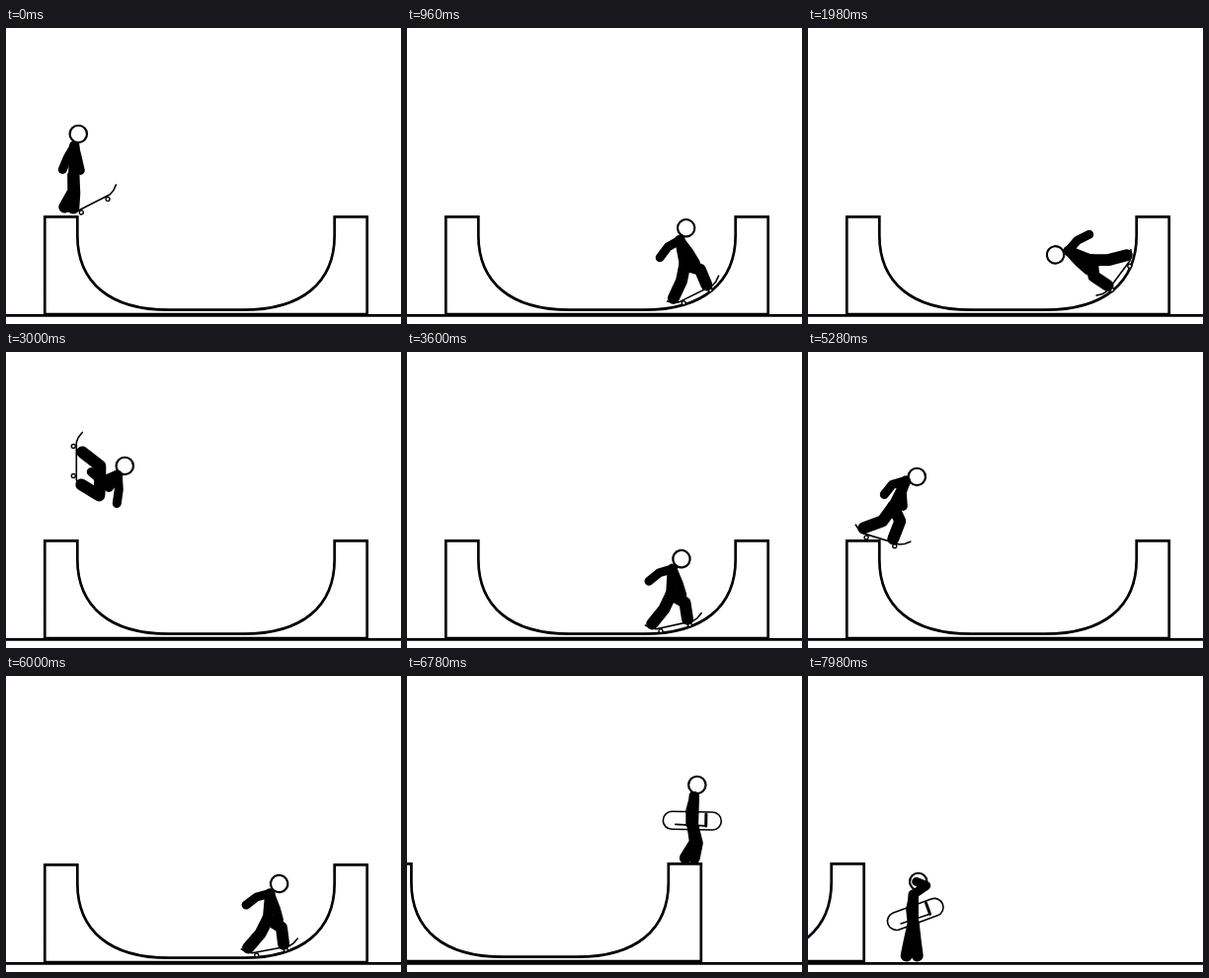
These frames come from a looping animation (400 px wide and 300 px high, 8 s). An HTML page with a canvas:

```html
<!DOCTYPE html>
<html lang="en">
<head>
<meta charset="utf-8">
<title>Half-pipe</title>
<style>
html, body { margin: 0; width: 100%; height: 100%; overflow: hidden; background: #fff; }
canvas { display: block; width: 100%; height: 100%; }
</style>
</head>
<body>
<canvas id="stage" width="400" height="300"></canvas>
<script>
const LOOP = 8000, STEP = 60;
const ctx = document.getElementById('stage').getContext('2d');
const rad = Math.PI / 180;
const mix = (a, b, p) => a + (b - a) * p;

const bowl = 'V210 C72.3 258 105 285.7 165 285.7 H240 C300 285.7 332.7 258 332.7 210 V';
const rampShape = new Path2D(`M39.3 290 V191.3 H72.3 ${bowl}191.3 H365.7 V290 Z`);
const track = document.createElementNS('http://www.w3.org/2000/svg', 'path');
track.setAttribute('d', `M72.3 0 ${bowl}0`);
const middle = track.getTotalLength() / 2;

// Board centre and slope at distance u from the middle of the bowl.
function onRamp(u) {
  const p = track.getPointAtLength(middle + u);
  const a = track.getPointAtLength(middle + u - 1);
  const b = track.getPointAtLength(middle + u + 1);
  const angle = Math.atan2(b.y - a.y, b.x - a.x);
  return { x: p.x + 6 * Math.sin(angle), y: p.y - 6 * Math.cos(angle), angle: angle / rad };
}

// Joints relative to the board centre; limbs are [middle joint, end].
const ready = {
  head: [-15, -70], neck: [-19, -58], hip: [-20, -28],
  armA: [-26, -46, -31, -34], armB: [-16, -46, -13, -33],
  legA: [-20, -12, -29, 4], legB: [-19, -10, -20, 5]
};
const ride = {
  head: [21, -64], neck: [10, -56], hip: [3, -31],
  armA: [-4, -55, -16, -49], armB: [13, -40, 14, -28],
  legA: [-7, -18, -22, -6], legB: [15, -20, 14, -3]
};
const grab = {
  head: [5, -49], neck: [14, -42], hip: [22, -24],
  armA: [29, -43, 43, -41], armB: [27, -33, 11, -15],
  legA: [5, -24, -9, -6], legB: [35, -23, 24, -5]
};
const kick = {
  head: [-47, -44], neck: [-51, -33], hip: [-42, -6],
  armA: [-61, -23, -68, -11], armB: [-41, -22, -28, -26],
  legA: [-29, -14, -10, -20], legB: [-32, 8, -18, 22]
};
const stall = {
  head: [36, -63], neck: [25, -59], hip: [12, -33],
  armA: [11, -55, 3, -45], armB: [21, -47, 22, -33],
  legA: [1, -18, -18, -11], legB: [19, -18, 12, 0]
};
const stand = {
  head: [9, -78], neck: [6, -67], hip: [5, -35],
  armA: [2, -52, 2, -38], armB: [5, -52, 5, -38],
  legA: [7, -20, -3, -4], legB: [9, -19, 6, -4]
};
const relax = {
  ...stand, head: [7, -80], neck: [2, -67], hip: [2, -38],
  armA: [5, -54, 6, -42], armB: [-1, -52, 0, -42],
  legA: [-2, -20, -5, -5], legB: [4, -20, 6, -5]
};
const salute = { ...relax, armA: [15, -76, 5, -80] };

const mirror = pose => Object.fromEntries(Object.entries(pose)
  .map(([name, pts]) => [name, pts.map((v, i) => i % 2 ? v : -v)]));
const rideL = mirror(ride), grabR = mirror(grab), stallR = mirror(stall);

// u: place on ramp, dx/dy: shift, turn: board, lean: body, flip: board side.
const base = { u: 0, dx: 0, dy: 0, turn: 0, lean: 0, flip: 1, tilt: 1 };
const key = (t, u, pose, extra) => ({ ...base, t, u, pose, ...extra });
const leftStall = { dx: -4, dy: -1, turn: -73, lean: -90 };
const rightStall = { dx: 12, dy: -6, turn: 90, lean: 90 };
const deckTop = { dx: 18, dy: -4, turn: 90, lean: 90 };
const walk = (t, dx, dy, pose = stand, tilt = 1) =>
  key(t, 193, pose, { dx, dy, turn: 90, lean: 90, tilt });

const keys = [
  key(0, -193, ready, { dx: 10, dy: -13, turn: -117, lean: -90 }),
  key(240, -193, ready, { dx: 9, dy: -12, turn: -108, lean: -80 }),
  key(360, -190, ride, { dx: 4, dy: -3, turn: -40, lean: -50 }),
  key(480, -160, ride),
  key(600, -110, ride),
  key(840, 21, ride),
  key(960, 94, ride),
  key(1140, 194, ride),
  key(1320, 272, grabR, { dx: 4 }),
  key(1470, 299, grabR, { dx: 5 }),
  key(1680, 278, grabR, { dx: 4 }),
  key(1860, 198, rideL),
  key(2175, 0, rideL),
  key(2490, -195, rideL),
  key(2640, -258, grab, { dx: -4 }),
  key(2790, -287, grab, { dx: -6 }),
  key(3000, -273, grab, { dx: -7 }),
  key(3180, -190, ride),
  key(3360, -70, ride),
  key(3600, 70, ride),
  key(3780, 175, ride),
  key(3840, 193, ride, { turn: 30, lean: 30 }),
  key(3960, 193, stallR, rightStall),
  key(4140, 193, stallR, { ...rightStall, turn: 80 }),
  key(4200, 195, stallR, { dx: 4, dy: -8, turn: 60, lean: 90 }),
  key(4320, 215, kick, { dx: 2, turn: 6, lean: 90, flip: -1 }),
  key(4440, 180, rideL),
  key(4740, 0, rideL),
  key(5040, -190, rideL),
  key(5160, -193, stall, leftStall),
  key(5280, -193, stall, leftStall),
  key(5340, -193, stall, { ...leftStall, turn: -62, lean: -80 }),
  key(5460, -178, ride),
  key(5640, -100, ride),
  key(5880, -2, ride),
  key(6060, 105, ride),
  key(6180, 190, ride, { turn: 20, lean: 20 }),
  key(6300, 193, stand, deckTop),
  key(6720, 193, stand, deckTop),
  walk(6780, 26, -2),
  walk(6960, 42, -2),
  walk(7080, 57, 12),
  walk(7200, 76, 58),
  walk(7260, 83, 98, relax),
  walk(7380, 87, 98, relax),
  walk(7560, 87, 98, relax),
  walk(7800, 87, 98, salute, -14),
  walk(7980, 87, 98, salute, -20)
];

const slope = i => {
  const a = keys[Math.max(i - 1, 0)], b = keys[Math.min(i + 1, keys.length - 1)];
  return (b.u - a.u) / (b.t - a.t);
};

function sample(t) {
  let i = keys.findIndex(k => k.t > t) - 1;
  if (i < 0) i = keys.length - 2;
  const a = keys[i], b = keys[i + 1], span = b.t - a.t, p = (t - a.t) / span;
  const state = { pose: {} };
  for (const name in base) state[name] = mix(a[name], b[name], p);
  if (a.u !== b.u) {
    const q = 1 - p;
    state.u = a.u * q * q * (1 + 2 * p) + b.u * p * p * (3 - 2 * p)
      + span * p * q * (slope(i) * q - slope(i + 1) * p);
  }
  for (const name in a.pose)
    state.pose[name] = a.pose[name].map((v, j) => mix(v, b.pose[name][j], p));
  return state;
}

function line(width, ...pts) {
  ctx.lineWidth = width;
  ctx.beginPath();
  for (let i = 0; i < pts.length; i += 2) ctx.lineTo(pts[i], pts[i + 1]);
  ctx.stroke();
}

function circle(x, y, r, width) {
  ctx.lineWidth = width;
  ctx.beginPath();
  ctx.arc(x, y, r, 0, 2 * Math.PI);
  ctx.fill();
  ctx.stroke();
}

function at(x, y, angle, flip, draw) {
  ctx.save();
  ctx.translate(x, y);
  ctx.rotate(angle * rad);
  ctx.scale(1, flip);
  draw();
  ctx.restore();
}

function sideBoard() {
  line(1.6, -29, -6, -24, -2, -19, 0, 19, 0, 24, -2, 29, -6);
  circle(-15, 3, 2, 1.4);
  circle(15, 3, 2, 1.4);
}

function heldBoard() {
  ctx.lineWidth = 1.6;
  ctx.beginPath();
  ctx.roundRect(-29.5, -9, 59, 18, 9);
  ctx.fill();
  ctx.stroke();
  line(1.6, -17, 4, 14, 5);
  line(3, 14, 5, 14, -7);
}

function body(p) {
  line(10.5, ...p.neck, ...p.hip);
  line(12, ...p.hip, ...p.legA);
  line(12, ...p.hip, ...p.legB);
  circle(...p.head, 8.7, 2.2);
  line(9, ...p.neck, ...p.armA);
  line(9, ...p.neck, ...p.armB);
}

function draw(t) {
  const s = sample(t), spot = onRamp(s.u), carrying = t >= 6780;
  const x = spot.x + s.dx, y = spot.y + s.dy;
  const left = 1 - Math.min(Math.max((t - 6720) / 780, 0), 1);
  const pan = 309 * (1 - left ** 3.1);

  ctx.fillStyle = '#fff';
  ctx.strokeStyle = '#000';
  ctx.lineCap = ctx.lineJoin = 'round';
  ctx.fillRect(0, 0, 400, 300);
  line(2.6, -5, 291.4, 405, 291.4);
  ctx.save();
  ctx.translate(-pan, 0);
  ctx.lineJoin = 'miter';
  ctx.lineWidth = 2.7;
  at(0, carrying ? -1 : 0, 0, 1, () => ctx.stroke(rampShape));
  ctx.lineJoin = 'round';
  if (carrying) at(x + 4, y - 42 + s.tilt / 4, s.tilt, 1, heldBoard);
  else at(x, y, spot.angle + s.turn, s.flip, sideBoard);
  at(x, y, spot.angle + s.lean, 1, () => body(s.pose));
  ctx.restore();
}

const start = performance.now();
function tick() {
  const t = (performance.now() - start) % LOOP;
  draw(Math.floor(t / STEP) * STEP);
  requestAnimationFrame(tick);
}
tick();
</script>
</body>
</html>
```
